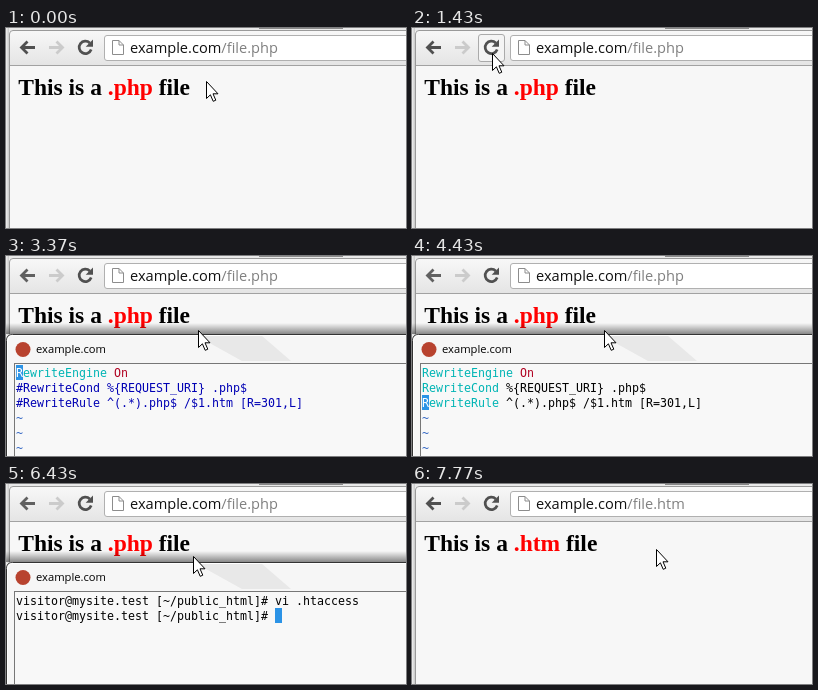
An HTML page for the animation above (8.03 s loop, 400 by 200 pixels).

```html
<!DOCTYPE html>
<html lang="en">
<head>
<meta charset="utf-8">
<title>Redirecting .php to .htm</title>
<style>
  html, body { margin: 0; width: 100%; height: 100%; overflow: hidden; background: #f7f7f7; }
  svg { display: block; width: 400px; height: 200px; }
  text { white-space: pre; }
  .url { font: 14.6px "Open Sans", "Noto Sans", sans-serif; }
  .title { font: 11.2px "Open Sans", "Noto Sans", sans-serif; }
  .heading { font: bold 23.5px "Liberation Serif", "Noto Serif", serif; }
  .mono { font: 11.63px "DejaVu Sans Mono", "Liberation Mono", monospace; }
</style>
</head>
<body>
<svg viewBox="0 0 400 200">
  <defs>
    <linearGradient id="bar" x2="0" y2="1">
      <stop stop-color="#f8f8f8"/><stop offset="1" stop-color="#e4e4e4"/>
    </linearGradient>
    <linearGradient id="edge">
      <stop stop-color="#f0f0f0"/><stop offset="1" stop-color="#c8c8c8"/>
    </linearGradient>
    <linearGradient id="shadow" x2="0" y2="1">
      <stop stop-color="#000" stop-opacity="0"/><stop offset="1" stop-color="#000" stop-opacity=".45"/>
    </linearGradient>
  </defs>

  <g id="browser">
    <rect width="400" height="200" fill="#f7f7f7"/>
    <rect width="400" height="3" fill="#e9e9e9"/>
    <rect width="3" height="200" fill="url(#edge)"/>
    <path d="M3 38V6Q3 2 7 2H400V38Z" fill="url(#bar)"/>
    <path d="M3.5 200V6Q3.5 2.5 7 2.5H400" fill="none" stroke="#9a9a9a"/>
    <path d="M253 .5H337" stroke="#8a8a8a"/>
    <path d="M4 37.5H400" stroke="#a2a2a2"/>

    <g fill="none" stroke-width="2.8">
      <path id="back" d="M29 19.5H16M21.5 13.5L15.5 19.5L21.5 25.5" stroke="#505050"/>
      <path d="M43 19.5H56M50.5 13.5L56.5 19.5L50.5 25.5" stroke="#cbcbcb"/>
    </g>
    <rect id="button" x="66.5" y="6.5" width="26" height="27" rx="2.5" stroke="#aaa"/>
    <path d="M83.8 15A6.2 6.2 0 1 0 85.2 21.5" fill="none" stroke="#505050" stroke-width="2.7"/>
    <path d="M87 11.5V18.8H79.7Z" fill="#505050"/>

    <rect x="98.5" y="7.5" width="320" height="25" rx="2.5" fill="#fff" stroke="#b0b0b0"/>
    <path d="M106.5 12.5H113L117.5 17V26.5H106.5ZM113 12.5V17H117.5" fill="#fff" stroke="#8c8c8c"/>
    <text class="url" x="124" y="25" fill="#111">example.com<tspan fill="#808080">/file.<tspan id="urlType"></tspan></tspan></text>
    <text class="heading" x="12.3" y="67">This is a <tspan fill="#f00">.<tspan id="pageType"></tspan></tspan> file</text>
  </g>

  <g id="terminal">
    <rect y="67" width="400" height="11" fill="url(#shadow)"/>
    <path d="M0 200V84Q0 78 6 78H400V200Z" fill="#f6f6f6"/>
    <path d="M.5 200V84.5Q.5 78.5 6.5 78.5H400" fill="none" stroke="#333"/>
    <path d="M1.5 200V85Q1.5 79.5 7 79.5H400" fill="none" stroke="#fff"/>
    <path d="M191 80H256L285 105H236Z" fill="#e8e8e8"/>
    <circle cx="17" cy="93.5" r="7.5" fill="#b8432f"/>
    <text class="title" x="30" y="97">example.com</text>
    <rect x="8.5" y="107.5" width="400" height="100" fill="#f8f8f8" stroke="#777"/>
    <g id="screen" class="mono"></g>
    <rect id="caret"/>
    <text id="caretChar" class="mono" fill="#fff"></text>
  </g>

  <path id="mouse" d="M.5 .5V17.5L4.400 13.8L7.2 20.3L9.8 19.2L7 12.8H12Z" fill="#fff" stroke="#000"/>
</svg>

<script>
const LOOP = 8030;
const CELL = 7, ROW = 15, LEFT = 10, TOP = 109;
const PROMPT = 'visitor@mysite.test [~/public_html]# ';
const CODE = ['RewriteEngine On', 'RewriteCond %{REQUEST_URI} .php$', 'RewriteRule ^(.*).php$ /$1.htm [R=301,L]'];
const UNCOMMENT = [3370, 3900, 4430];
const CARET_DOWN = [3630, 4100];

// Each move: first step, last step, number of steps, destination.
const START = [200, 53];
const MOVES = [
  [100, 570, 8, [74, 18]],
  [1430, 1430, 1, [80, 25]],
  [1500, 1830, 6, [214, 59]],
  [2100, 2100, 1, [217, 62]],
  [2165, 2230, 2, [192, 74]],
  [6370, 6830, 8, [73, 16]],
  [7770, 7770, 1, [244, 65]]
];

const $ = id => document.getElementById(id);
const set = (id, attrs) => { for (const k in attrs) $(id).setAttribute(k, attrs[k]); };
const within = (t, a, b) => t >= a && t < b;
const smooth = u => u * u * (3 - 2 * u);

function mouseAt(t) {
  let pos = START;
  for (const [first, last, steps, to] of MOVES) {
    if (t < first) break;
    const gap = steps > 1 ? (last - first) / (steps - 1) : 1;
    const step = Math.min(steps, Math.floor((t - first) / gap + 1e-6) + 1);
    const u = smooth(step / steps);
    pos = pos.map((v, i) => Math.round(v + (to[i] - v) * u));
  }
  return pos;
}

const span = (color, s) => `<tspan fill="${color}">${s}</tspan>`;

function codeLine(i, active) {
  if (!active) return span('#0000b4', '#' + CODE[i]);
  const [word, ...rest] = CODE[i].split(' ');
  return span('#00b4b4', word) + span(i ? '#000' : '#b00020', ' ' + rest.join(' '));
}

function editor(t) {
  const row = CARET_DOWN.filter(at => t >= at).length;
  const lines = CODE.map((_, i) => codeLine(i, t >= UNCOMMENT[i]));
  const tilde = span('#3568c4', '~');
  return { lines: [...lines, tilde, tilde, tilde], row, col: 0, char: t >= UNCOMMENT[row] ? 'R' : '#' };
}

function shell() {
  return { lines: [PROMPT + 'vi .htaccess', PROMPT], row: 1, col: PROMPT.length, char: '' };
}

function drawTerminal(t) {
  const { lines, row, col, char } = t < 5370 ? editor(t) : shell();
  const baseline = i => TOP + ROW * i + 12;
  const markup = lines.map((s, i) => `<text x="${LEFT}" y="${baseline(i)}">${s}</text>`).join('');
  if (drawTerminal.last !== markup) $('screen').innerHTML = drawTerminal.last = markup;

  const hollow = t >= 7170, inset = hollow ? 0.5 : 0;
  set('caret', {
    x: LEFT + CELL * col + inset, y: TOP + ROW * row + inset,
    width: CELL - 2 * inset, height: ROW - 2 * inset,
    fill: hollow ? 'none' : '#2b93e6', stroke: hollow ? '#2b93e6' : 'none'
  });
  set('caretChar', { x: LEFT + CELL * col, y: baseline(row) });
  $('caretChar').textContent = char;
}

function draw(t) {
  const [x, y] = mouseAt(t);
  set('mouse', { transform: `translate(${x} ${y})` });

  const hover = x >= 66 && x < 93 && y >= 6 && y < 34;
  const pressed = within(t, 900, 1030) || within(t, 7230, 7370);
  set('button', { visibility: hover ? 'visible' : 'hidden', fill: pressed ? '#dcdcdc' : '#f4f4f4' });

  const type = t >= 7370 ? 'htm' : 'php';
  $('urlType').textContent = $('pageType').textContent = type;

  const open = within(t, 2630, 7230);
  set('terminal', { visibility: open ? 'visible' : 'hidden' });
  set('back', { stroke: open ? '#606060' : '#505050' });
  if (open) drawTerminal(t);
}

const began = performance.now();
function tick() {
  draw((performance.now() - began) % LOOP);
  requestAnimationFrame(tick);
}
tick();
</script>
</body>
</html>
```
